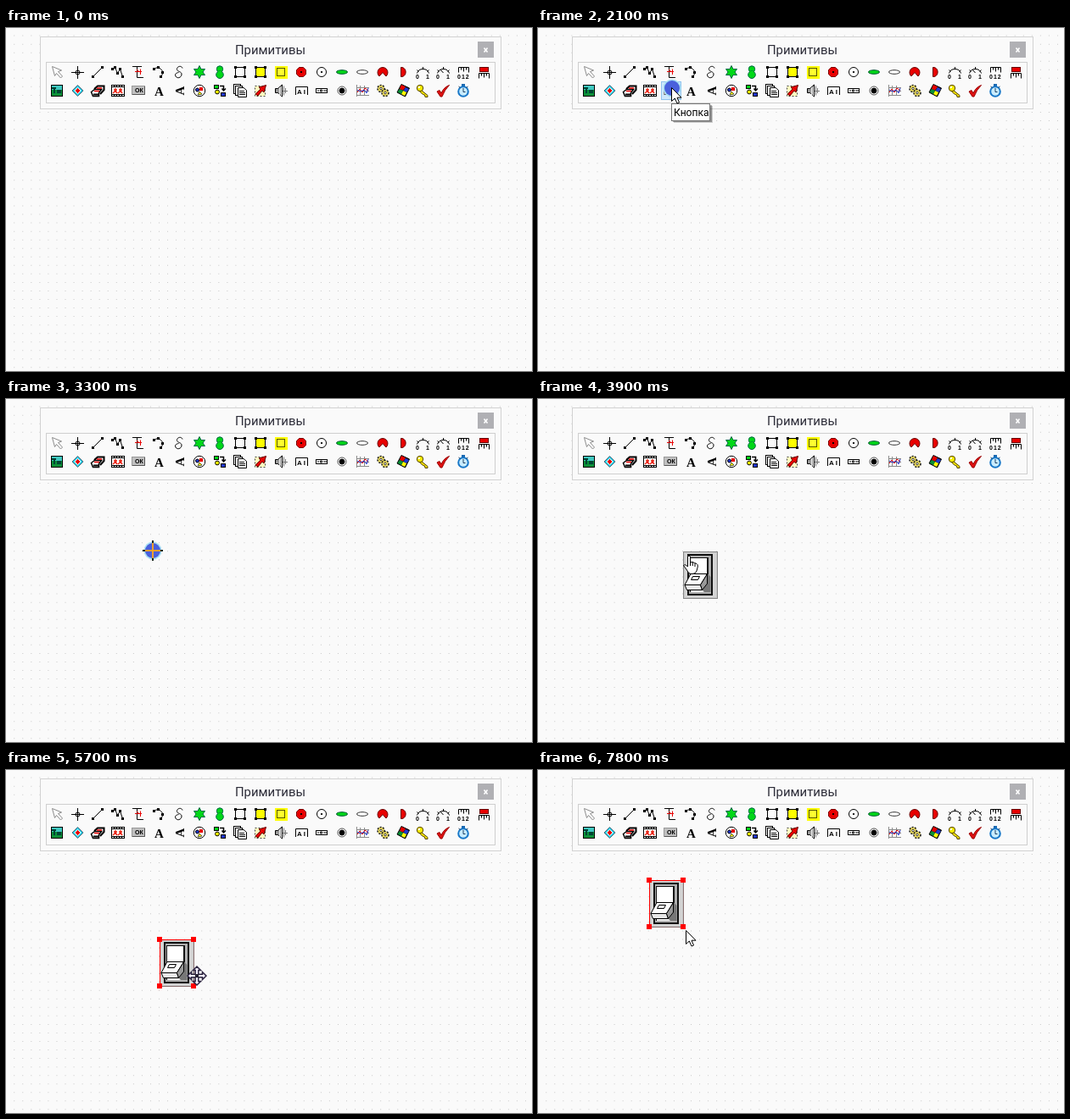
These frames come from a looping animation (620x405 px, 8 s). An HTML page:

```html
<!DOCTYPE html>
<html lang="ru">
<head>
<meta charset="utf-8">
<title>Примитивы</title>
<style>
  html, body { margin: 0; width: 100%; height: 100%; overflow: hidden; background: #fafafa; }
  svg { display: block; position: absolute; left: 0; top: 0; }
  .title { font: 14.9px Roboto, "Open Sans", sans-serif; fill: #2c2c38; }
  .tip { font: 12.1px Roboto, "Open Sans", sans-serif; fill: #000; }
  .tiny { font: bold 7px "Liberation Sans", Arial, sans-serif; }
  .serif { font: bold 15px "Liberation Serif", serif; }
</style>
</head>
<body>
<svg id="stage" width="620" height="405" viewBox="0 0 620 405"></svg>
<script>
const RED = '#e80000', GREEN = '#00d818', YELLOW = '#ffff00', BLUE = '#2038d0', CYAN = '#30d0e8';
const PITCH = 10.0455, STEP = 300, LOOP = 8000;

const P = (d, f = 'none', s = '#000', w = 1, more = '') =>
  `<path d="${d}" fill="${f}" stroke="${s}" stroke-width="${w}" ${more}/>`;
const R = (x, y, w, h, f, s = 'none', more = '') =>
  `<rect x="${x}" y="${y}" width="${w}" height="${h}" fill="${f}" stroke="${s}" ${more}/>`;
const C = (x, y, r, f, s = '#000', ry = r, more = '') =>
  `<ellipse cx="${x}" cy="${y}" rx="${r}" ry="${ry}" fill="${f}" stroke="${s}" ${more}/>`;
const T = (x, y, s, cls = 'tiny', more = '') =>
  `<text x="${x}" y="${y}" class="${cls}" ${more}>${s}</text>`;
const G = (id, body) => `<g id="${id}">${body}</g>`;
const dotsAt = (pts, size = 3, f = '#000') =>
  pts.map(([x, y]) => R(x - size / 2, y - size / 2, size, size, f)).join('');

const corners = dotsAt([[2.5, 2.5], [13.5, 2.5], [2.5, 13.5], [13.5, 13.5]]);
const box = f => R(2.5, 2.5, 11, 11, f, '#000') + corners;
const comb = y => P(`M2.5 ${y + 6}V${y}H14.5V${y + 6}M5.5 ${y}v3M8.5 ${y}v5M11.5 ${y}v3`);
const gear = (x, y, r) =>
  C(x, y, r, '#f0e060', '#222', r, 'stroke-width="1.6" stroke-dasharray="2 1.4"') + C(x, y, 1.3, '#fff', '#333');
const gauge = needle =>
  P('M1.5 9.5Q3 4.5 8.5 4.5T15.5 9.5M1.5 5.5l2 2M8.5 2v3M15.5 5.5l-2 2' + needle) +
  T(0, 16, '0') + T(12, 16, '1');

const rows = [[
  P('M2.5 1.5L13.5 6L9.5 7.5L14.5 13L12.5 15L7.5 9.5L5.5 12.5Z', '#fff', '#8a8a8a'),
  P('M8.5 1V16M1 8.5H16') + C(8.5, 8.5, 2.5, 'none'),
  P('M2.5 13.5L13.5 2.5') + dotsAt([[2.5, 13.5], [13.5, 2.5]]),
  P('M1.5 4.5L4.5 2.5L7.5 9.5L10.5 4.5L13.5 13.5') +
    dotsAt([[1.5, 4.5], [4.5, 2.5], [7.5, 9.5], [10.5, 4.5], [13.5, 13.5]]),
  P('M1 1.5H12M6.5 1.5V14.5H14') + P('M4 7.5H12M10.5 4.5V11M6 5L9 7.5', 'none', RED),
  P('M2.5 4.5Q7 1 10.5 4.5Q15 8 10.5 13.5') + dotsAt([[2.5, 4.5], [7.5, 2.5], [12.5, 8.5], [10.5, 13.5]]),
  P('M12 3.5C11 0 5.5 1 5.5 4.5S11.5 7 11 11S5.5 16 4 13S5 9 7.5 8.5'),
  P('M8 .5L10 4.5H14.5L12 8L14.5 11.5H10L8 15.5L6 11.5H1.5L4 8L1.5 4.5H6Z', GREEN, '#064'),
  C(8, 4.5, 3.7, GREEN, '#064') + C(8, 11.2, 4.3, GREEN, '#064') + R(6, 7, 4, 2, GREEN),
  box('#fafafa'),
  box(YELLOW),
  R(1, 1, 15, 15, YELLOW) + R(3.5, 3.5, 9, 9, '#ffff30', '#555500'),
  P('M5.5 2.5H10.5L13.5 5.5V10.5L10.5 13.5H5.5L2.5 10.5V5.5Z', RED, '#700') + R(7, 7, 2, 2, '#000'),
  C(8, 8, 5.5, '#fff') + R(7, 7, 2, 2, '#000'),
  C(8, 8, 6.5, GREEN, '#053', 2.3),
  C(8, 8, 6.5, '#fff', '#333', 2.3),
  P('M4 13A6 6 0 1 1 12 13L8 8.5Z', RED, '#600'),
  P('M5.5 2.5C13 2 13 14 5.5 13.5Z', RED, '#600'),
  gauge(''),
  gauge('M8.5 9L5 5'),
  comb(2.5) + T(1, 16, '012', 'tiny', 'letter-spacing="1"'),
  R(3.5, 2.5, 10, 5, RED, '#600') + comb(9.5)
], [
  R(1.5, 1.5, 13, 13, '#40c8c0', '#000') + R(2, 7, 12, 7, '#0a9038') +
    P('M4 11V6H2V4H7V6H6V11ZM8 11V7H13V11Z', '#043', 'none'),
  P('M8.5 1.5L15 8L8.5 14.5L2 8Z', CYAN, '#467') + P('M8.5 4.5L12 8L8.5 11.5L5 8Z', RED, '#fff'),
  P('M.5 9.5L4.5 6.5H12.5L9.5 10.5V14.5H2.5Z', '#fff', '#000', 1.5) +
    P('M4 6L8 2.5H15.5V7L11 12M3 12.5H9', 'none', '#000', 2) + P('M7 5H13M4 8.5H10', 'none', RED, 1.3),
  R(0, 1, 16, 14, '#000') + R(1, 4, 14, 8, '#fff') +
    P('M1 2.5H15M1 13.5H15', 'none', '#fff', 1, 'stroke-dasharray="2 1"') +
    P('M5 5v3l-3 3M5 8l2 3M3 7h4M11 5v3l-3 3M11 8l2 3M9 7h4', 'none', '#e82010', 1.4),
  R(.5, 2.5, 15, 10, '#c0c0c0', '#999') + P('M1 12.5H15.5V3', 'none', '#555') + T(4, 10, 'ОК'),
  T(3, 13.5, 'A', 'serif'),
  T(0, 0, 'A', 'serif', 'transform="translate(13.5 13.5) rotate(-90)"'),
  C(8, 8, 6.7, '#fff') + R(8, 4, 4, 4, RED) + C(5.5, 7, 2, BLUE) + P('M6 13L8 9L11 12Z', YELLOW, '#553'),
  R(1.5, 1.5, 5, 4, GREEN, '#000') + P('M8 2.5H12.5V7M10.5 5.5L12.5 8L15 5.5', 'none', '#000', 1.5) +
    C(5, 9.5, 2.4, YELLOW) + R(9.5, 10.5, 5, 4, BLUE, '#000'),
  R(.5, .5, 8, 11, '#fff', '#000') + R(2.5, 2.5, 8, 11, '#fff', '#000') +
    P('M5.5 4.5H12L15.5 7.5V15.5H5.5Z', '#fff') + P('M7 8.5H13M7 10.5H14M7 12.5H14'),
  R(1.5, 2.5, 12, 12, '#ffffc0', '#444', 'stroke-dasharray="2 2"') +
    P('M2 12L8 6L6 4L14.5 1.5L12 10L10 8L5 14Z', RED, '#600'),
  P('M1.5 5.5H4.5L9.5 1V15L4.5 10.5H1.5Z', '#999') + P('M6.5 4V13M8.5 3V14', 'none', '#eee') +
    P('M11.5 2.5V13.5M13.5 5V11M10 8.5H16', 'none', '#777'),
  P('M1.5 13V3.5H15.5V13', '#fff') + T(3, 12, 'A I', 'tiny', 'style="font-size:8px"'),
  R(1.5, 5.5, 13, 5, '#fff', '#000') + P('M4 7v2M6.5 7h2v2h-2zM11 7v2M13 7v2'),
  C(8, 8, 5, '#fff', '#555') + C(8, 8, 3, '#000'),
  R(1, 2, 14, 12, '#fff') + P('M1.5 1V15M1 13.5H16M1 4.5H16M1 8.5H16M5.5 2V14M10.5 2V14', 'none', '#888') +
    P('M2 10L5 6L8 10L11 5L15 8', 'none', RED) + P('M2 7L6 9L10 7L13 11L15 5', 'none', BLUE),
  gear(6, 5.5, 4) + gear(11, 10.5, 4),
  P('M6 .5L15.5 5L10.5 15L1 10Z', '#181818') + P('M6 1L11 3.5L8 7.5L4 6Z', RED, 'none') +
    P('M11 4L15 6L12 10L8.5 8Z', BLUE, 'none') + P('M8 8L12 10L10 14L6 12Z', YELLOW, 'none') +
    P('M4 6L8 8L6 12L1.5 9.5Z', '#0a9038', 'none'),
  P('M6 7L14 13.5V15.5H11L10.5 13L8.5 12.5L4.5 9Z', '#f0e000', '#554400') +
    C(5, 5, 3.7, '#f8ec00', '#554400') + R(3, 3, 2, 2, '#fff'),
  P('M1 9L4 7.5L6 11Q9 4 15.5 1.5Q10 7 7 15H5Z', '#e01010', '#900'),
  R(6, 0, 4, 3, '#1868b0') + C(8, 9, 5.8, '#c8ecff', '#1878c8', 5.8, 'stroke-width="2"') +
    P('M8 5V9.5H10.5M2.5 3L4.5 4.5M13.5 3L11.5 4.5', 'none', '#204060')
]];

const icons = rows.map((row, r) => row.map((art, c) =>
  `<g transform="translate(${Math.round(52.4 + c * 23.95)} ${44 + r * 22})">${art}</g>`).join('')).join('');

let grid = '';
for (let i = 0; i <= 60; i++)
  for (let j = 0; j <= 39; j++)
    grid += `M${(9.23 + i * PITCH).toFixed(2)} ${(8.59 + j * PITCH).toFixed(2)}h1v1h-1z`;

const tip = (id, w, s) => G(id,
  R(3, 3, w, 20, 'rgba(0,0,0,.18)') + R(2, 2, w, 20, 'rgba(0,0,0,.3)') +
  R(.5, .5, w - 1, 20, '#fff', '#767676') + T(3, 14.5, s, 'tip'));

const rocker =
  R(.5, .5, 40, 55, '#c8c8c8', '#888') + R(2, 2, 37, 52, '#d4d4d4') +
  R(5, 3, 30, 49, '#111') + R(7, 5, 26, 45, '#b0b0b0') + R(8, 7, 22, 41, '#111') +
  R(9, 8, 19, 18, '#fff') + R(9, 39, 20, 9, '#f0f0f0') +
  P('M28.5 26L32.5 30V48H25L22 45Z', '#777', 'none') +
  P('M9 26.5H28.5L20.5 39.5H2Z', '#fff') + P('M11.5 29.5H19.5L17.5 33.5H9.5Z', '#eee') +
  P('M2 39.5H20.5L22.5 45.5H4.5Z', '#e8e8e8') + P('M20.5 39.5L28.5 26.5V38L22.5 45.5Z', '#999');
const select = P('M.5 55V.5H40', 'none', '#f00') + P('M40.5 1V55.5H1', 'none', '#8a7070') +
  dotsAt([[0, 0], [40, 0], [0, 55], [40, 55]], 6, '#f00');

const cursors = {
  arrow: P('M.5 .5V16.5L4.3 13L7 19L9.5 18L7 12.2H12Z', '#fff'),
  cross: P('M-12 0H12M0 -12V12', 'none', '#10241c', 2),
  hand: P('M-1.5 1Q0 -1 1.5 1V8L4 7.5L6.5 8.5L9 9.5Q10.5 10 10.3 13L9 18Q8 21.5 4 21.5H2Q-1 21-2.5 17' +
    'L-6.5 11.5Q-5 9.5-2.5 12L-1.5 13Z', '#fff') + P('M1.5 8V12M4.2 8V12M7 9V13'),
  move: P('M0 -11L4.5 -6.5H1.8V-1.8H6.5V-4.5L11 0L6.5 4.5V1.8H1.8V6.5H4.5L0 11L-4.5 6.5H-1.8V1.8H-6.5V4.5' +
    'L-11 0L-6.5 -4.5V-1.8H-1.8V-6.5H-4.5Z', '#f4f0ff', '#2c2440', 1.5) + C(0, 0, 1.5, '#403060')
};

const stage = document.getElementById('stage');
stage.innerHTML =
  R(0, 0, 620, 405, '#fafafa') + P(grid, '#c8c8c8', 'none') +
  R(40.5, 10.5, 543, 85, '#fafafa', '#d2d2d2') + R(47.5, 40.5, 529, 48, '#fafafa', '#cfcfcf') +
  T(311.5, 31, 'Примитивы', 'title', 'text-anchor="middle"') +
  R(556, 16, 19, 19, '#b0b0b4') + P('M563.5 23.5L567.5 28.5M567.5 23.5L563.5 28.5', 'none', '#fff', 1.6) +
  G('hover', R(145.5, 63.5, 23, 21, '#cfe8fb', '#8fc3ee')) +
  G('icons', icons) +
  G('button', rocker + G('select', select)) +
  tip('tipIcon', 46, 'Кнопка') + tip('tipButton', 87, 'Button : Button') +
  G('disc', C(0, 0, 10.5, '#a8e0f4', 'none') + C(0, 0, 9, '#4a60dc', 'none')) +
  G('ring', C(0, 0, 14, 'none', '#8cc8f0', 14, 'stroke-width="3" opacity=".6"')) +
  Object.entries(cursors).map(([k, art]) => G(k, art)).join('') +
  G('glow', P('M-9 0H9M0 -9V9', 'none', '#f0a030', 2));

const part = {};
stage.querySelectorAll('g[id]').forEach(g => part[g.id] = g);

// time, x, y
const pointer = [[300, 245, 190], [900, 165, 83], [1200, 157, 70], [2100, 157, 70], [3000, 173, 179],
  [3600, 173, 179], [4200, 183, 191], [4500, 183, 191], [4800, 202, 228], [5100, 215, 228],
  [6300, 235, 258], [6600, 235, 258], [7500, 174, 178], [7800, 174, 189]];
// time, grid column, grid row
const drag = [[5100, 16, 17], [6300, 18, 20], [6600, 18, 20], [7500, 12, 12]];
const clicks = [[2100, 158, 71], [3300, 173, 179], [4500, 183, 191]];

function along(keys, t) {
  let i = keys.findIndex(k => k[0] >= t);
  if (i < 0) i = keys.length - 1;
  const b = keys[i], a = keys[Math.max(0, i - 1)];
  const u = b === a ? 1 : Math.min(1, (t - a[0]) / (b[0] - a[0]));
  return [1, 2].map(n => a[n] + (b[n] - a[n]) * u);
}

function show(id, on, x = 0, y = 0) {
  part[id].setAttribute('visibility', on ? 'inherit' : 'hidden');
  part[id].setAttribute('transform', `translate(${Math.round(x)} ${Math.round(y)})`);
}

function shape(t) {
  if (t < 600) return '';
  if (t < 2700) return 'arrow';
  if (t < 3600) return 'cross';
  if (t < 5100) return 'hand';
  return t < 7800 ? 'move' : 'arrow';
}

function draw(t) {
  const [x, y] = along(pointer, t);
  const kind = shape(t);
  Object.keys(cursors).forEach(k => show(k, k === kind, x, y));

  const [gx, gy] = along(drag, t).map(Math.round);
  show('button', t >= 3600, 10.2 + gx * PITCH, 9 + gy * PITCH);
  part.select.setAttribute('visibility', t >= 4500 ? 'inherit' : 'hidden');

  show('hover', t >= 1200 && t < 2400);
  show('tipIcon', t >= 1500 && t < 2400, 157, 89);
  const paused = t >= 6300 && t < 6900;
  show('tipButton', t >= 4800 && t < 5400 || paused, paused ? 244 : 214, paused ? 217 : 175);

  const hit = clicks.find(c => t >= c[0] && t < c[0] + 2 * STEP) || [-LOOP, 0, 0];
  const age = t - hit[0];
  show('disc', age < STEP, hit[1], hit[2]);
  show('ring', age >= STEP && age < 2 * STEP, hit[1], hit[2]);
  show('glow', age < STEP && kind === 'cross', x, y);
}

const start = performance.now();
function tick() {
  const t = (performance.now() - start) % LOOP;
  draw(Math.floor(t / STEP) * STEP);
  requestAnimationFrame(tick);
}
tick();
</script>
</body>
</html>
```
